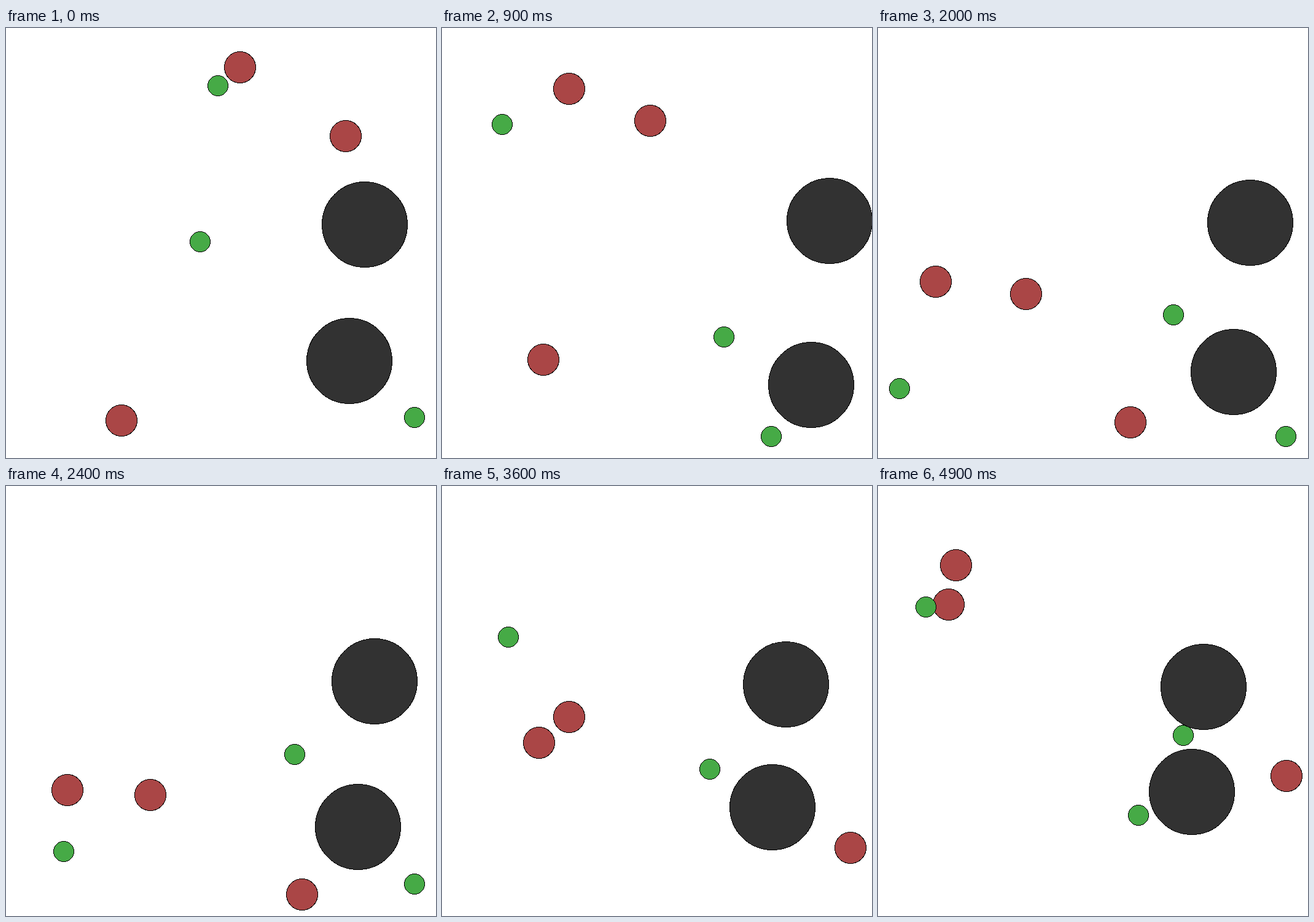
An HTML page that plays this animation: 700x700 px, repeating every 5 s.

```html
<!DOCTYPE html>
<html lang="en">
<head>
<meta charset="utf-8">
<title>Roaming balls</title>
<style>
  html, body { margin: 0; width: 100%; height: 100%; overflow: hidden; background: #fff; }
  svg { display: block; }
  circle { stroke: #000; shape-rendering: crispEdges; }
</style>
</head>
<body>
<svg id="stage" width="700" height="700"></svg>
<script>
const stage = document.getElementById('stage');
const STEP = 100, STEPS = 50, MIN = 35, MAX = 665;
const TIMES = [0, 6, 13, 20, 29, 42, 49];

// Smooth curve through [time, value] keys, with natural ends.
function spline(keys) {
  const last = keys.length - 1, span = [], slope = [], m = [];
  for (let i = 0; i < last; i++) {
    span[i] = keys[i + 1][0] - keys[i][0];
    slope[i] = (keys[i + 1][1] - keys[i][1]) / span[i];
  }
  for (let i = 1; i < last; i++) {
    m[i] = (slope[i - 1] * span[i] + slope[i] * span[i - 1]) / (span[i - 1] + span[i]);
  }
  m[0] = (3 * slope[0] - m[1]) / 2;
  m[last] = (3 * slope[last - 1] - m[last - 1]) / 2;
  return t => {
    let i = 0;
    while (i < last - 1 && t >= keys[i + 1][0]) i++;
    const u = (t - keys[i][0]) / span[i], v = 1 - u;
    return keys[i][1] * v * v * (1 + 2 * u) + keys[i + 1][1] * u * u * (1 + 2 * v)
      + span[i] * u * v * (m[i] * v - m[i + 1] * u);
  };
}

// Path through "x,y" points at the shared times; a point may name its own time as "x,y@t".
function path(text) {
  let shared = 0;
  const keys = text.split(' ').map(word => {
    const [point, time] = word.split('@');
    const [x, y] = point.split(',').map(Number);
    return { t: time ? Number(time) : TIMES[shared++], x, y };
  });
  const x = spline(keys.map(k => [k.t, k.x])), y = spline(keys.map(k => [k.t, k.y]));
  return t => [x(t), y(t)];
}

const balls = [];
function addBall(at, r, fill) {
  const el = document.createElementNS(stage.namespaceURI, 'circle');
  el.setAttribute('r', r);
  el.setAttribute('fill', fill);
  stage.append(el);
  balls.push({ el, at });
}
const addRed = points => addBall(path(points), 25.5, '#aa4646');
const addGreen = points => addBall(path(points), 16.5, '#46aa46');
const addDark = at => addBall(at, 69.5, '#323232');

addRed('381,64 259,35 150,224 94,413 124,546 165,270 115,193');
addRed('553,176 435,136 225,211 241,433 219,526 185,215 127,129');
addRed('188,639 152,541 218,570 411,642 553,665 665,589@36 665,441 665,472');
addGreen('345,94 139,50 78,354 35,587 170,505 108,246@36 122,187 78,197');
addGreen('316,348 435,442 491,583 664,665 639,597 512,492 497,406');
addGreen('665,634 595,665 466,665 481,467 449,446 429,490 424,536');

// The dark balls slide along two straight lines, sharing one shift.
const shift = spline([0, 54, 25, 22, 5, -46, -54].map((d, i) => [TIMES[i], d]));
addDark(t => [584 + shift(t), 320.2 - 0.124 * shift(t)]);
addDark(t => [559 + 0.89 * shift(t), 542 + 0.818 * shift(t)]);

const place = v => Math.round(Math.min(MAX, Math.max(MIN, v)));

function tick() {
  const t = Math.floor(performance.now() / STEP) % STEPS;
  for (const { el, at } of balls) {
    const [x, y] = at(t);
    el.setAttribute('cx', place(x));
    el.setAttribute('cy', place(y));
  }
  requestAnimationFrame(tick);
}
tick();
</script>
</body>
</html>
```
